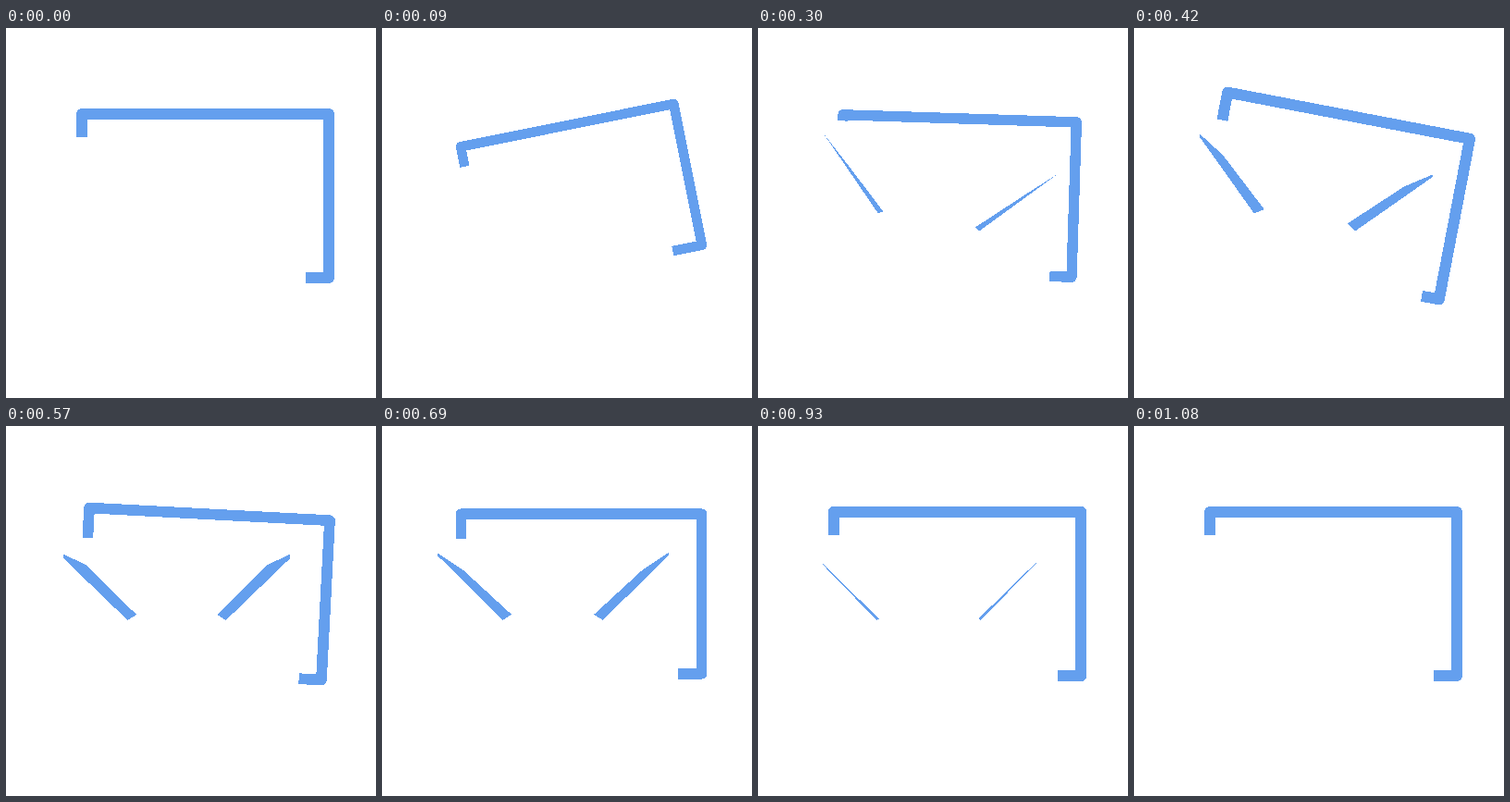
Write an HTML page that moves like this. It is 400x400 px and loops after 1110 ms.

```html
<!DOCTYPE html>
<html lang="en">
<head>
<meta charset="utf-8">
<style>
  html, body { margin: 0; width: 100%; height: 100%; overflow: hidden; background: #fff; }
  svg { display: block; width: 100vw; height: 100vh; }
</style>
</head>
<body>
<svg viewBox="0 0 400 400" shape-rendering="crispEdges">
  <path id="frame" fill="none" stroke="#649fee" stroke-width="12" stroke-linejoin="round"/>
  <path id="flaps" fill="#649fee"/>
</svg>
<script>
const LOOP = 1110, STEP = 30;
const frame = document.getElementById("frame");
const flaps = document.getElementById("flaps");

// Smooth rise from 0 to 1 between two times.
function ease(t, from, to) {
  const u = Math.min(1, Math.max(0, (t - from) / (to - from)));
  return u * u * (3 - 2 * u);
}

// Smooth rise to 1 and back to 0.
const bump = (t, from, peak, to) => ease(t, from, peak) - ease(t, peak, to);

const mix = (a, b, u) => a.map((v, i) => v + (b[i] - v) * u);
const line = points => "M" + points.join("L");

function place(node, x, y, angle, scale) {
  node.setAttribute("transform", `translate(${x} ${y}) rotate(${angle}) scale(${scale})`);
}

// A bent outline that shrinks, swings both ways and settles.
function drawFrame(t) {
  const w = 133.5, h = 88.5;
  const angle = -12.6 * ease(t, 0, 112) + 23.7 * ease(t, 112, 440) - 11.1 * ease(t, 470, 622);
  const scale = 1 - 0.137 * bump(t, 0, 115, 440) - 0.035 * bump(t, 440, 640, 800)
    + 0.007 * bump(t, 640, 800, 990);
  const head = 25 - 18 * bump(t, 120, 300, 400) + 9.5 * bump(t, 320, 500, 800);
  const tail = 25 + 12 * bump(t, 0, 100, 300) - 6 * bump(t, 300, 430, 570)
    + 2 * bump(t, 600, 800, 990);
  frame.setAttribute("d", line([[-w, head - h], [-w, -h], [w, -h], [w, h], [w - tail, h]]));
  place(frame, 215.5, 181.5, angle, scale);
}

// Two mirrored wedges that thicken, bulge at the knee and thin out again.
function drawFlaps(t) {
  const width = ease(t, 200, 400) - ease(t, 810, 990);
  const bulge = bump(t, 270, 540, 850);
  const foot = [55.5, 0], tip = [127.7, -74.5];
  const top = mix(foot, [45.5, -6.3], width);
  const knee = mix(mix(top, tip, 0.6), [102.8, -63], bulge);
  const right = [foot, top, knee, tip, [tip[0], tip[1] + 5 * bulge]];
  const left = right.map(([x, y]) => [-x, y]);
  flaps.setAttribute("d", width > 0 ? line(right) + "Z" + line(left) + "Z" : "");
  place(flaps, 184.6, 210, 9.8 * (1 - ease(t, 420, 565)),
    1 - 0.043 * bump(t, 430, 570, 810) + 0.015 * ease(t, 810, 900));
}

const start = performance.now();
function tick() {
  const t = Math.floor((performance.now() - start) % LOOP / STEP) * STEP;
  drawFrame(t);
  drawFlaps(t);
  requestAnimationFrame(tick);
}
tick();
</script>
</body>
</html>
```
